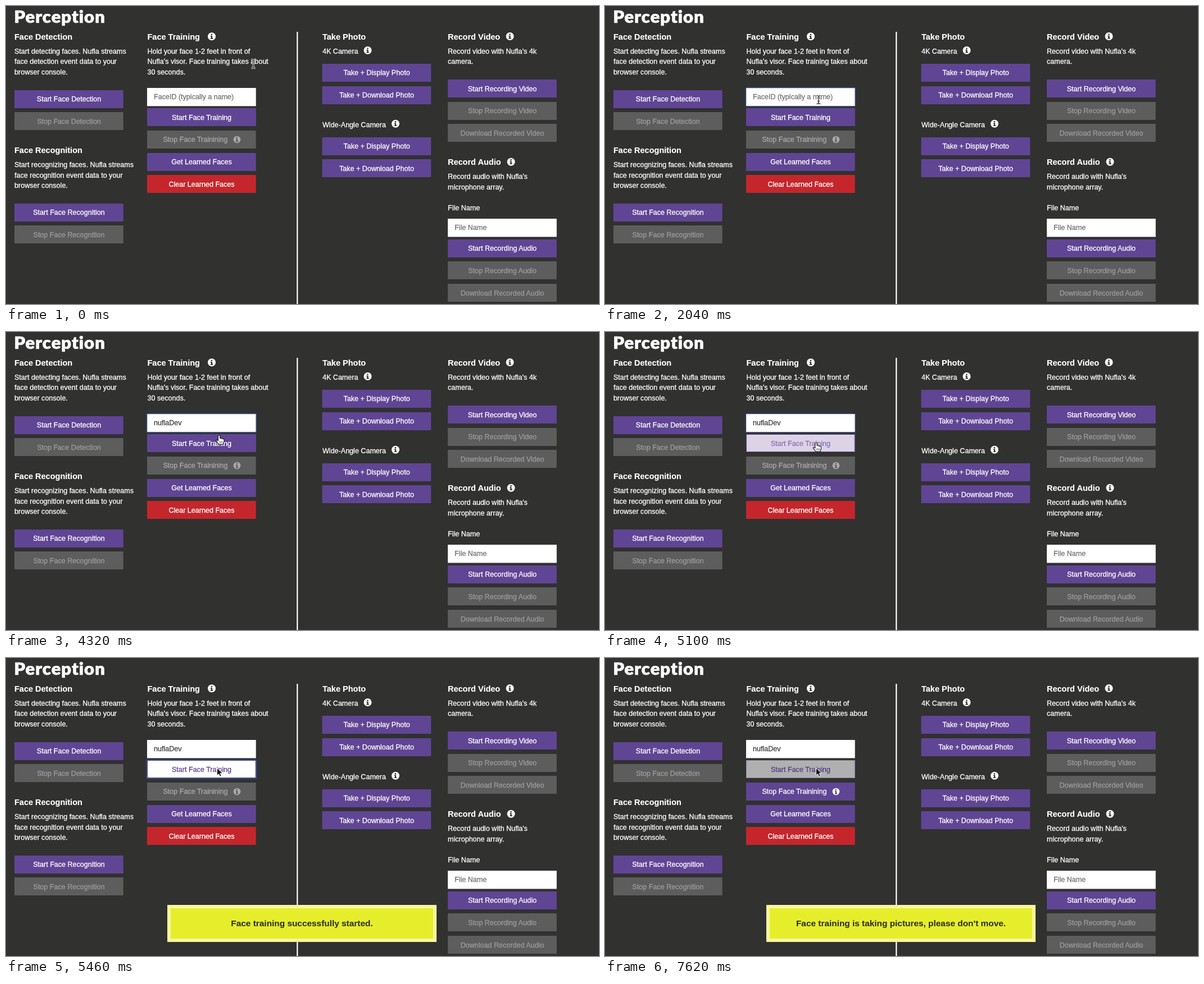
An HTML page that plays this animation: 1055 px wide and 531 px high, repeating every 8 s.

```html
<!DOCTYPE html>
<html lang="en">
<head>
<meta charset="utf-8">
<title>Perception</title>
<style>
html, body { margin: 0; width: 100%; height: 100%; overflow: hidden; background: #313130; }
svg { display: block; width: 1055px; height: 531px; }
text {
  font: 12.55px "Liberation Sans", Arial, sans-serif; white-space: pre;
  color: #fff; fill: currentColor; stroke: currentColor; stroke-width: .3px;
}
.title { font: 900 31px Lato, sans-serif; letter-spacing: 1px; stroke-width: .7px; }
.head { font-weight: bold; font-size: 14.5px; stroke-width: .15px; }
.toast { font-weight: bold; font-size: 15.4px; color: #33331c; stroke-width: .1px; }
.mid { text-anchor: middle; }
</style>
</head>
<body>
<svg id="stage" viewBox="0 0 1055 531"></svg>
<script>
const stage = document.getElementById('stage');
const PURPLE = [96, 69, 148], GREY = [93, 93, 93], WHITE = [255, 255, 255];
const rgb = c => `rgb(${c.map(Math.round)})`;
const mix = (a, b, k) => a.map((v, i) => v + (b[i] - v) * k);
const ramp = (t, from, to) => Math.min(1, Math.max(0, (t - from) / (to - from)));

function add(tag, attrs, parent = stage, content = '') {
  const el = document.createElementNS('http://www.w3.org/2000/svg', tag);
  set(el, attrs);
  el.textContent = content;
  return parent.appendChild(el);
}
function set(el, attrs) {
  for (const k in attrs) el.setAttribute(k, attrs[k]);
}
const label = (x, y, str, cls = '', parent = stage) => add('text', { x, y, class: cls }, parent, str);
const rect = (x, y, width, height, fill, parent = stage) => add('rect', { x, y, width, height, fill }, parent);
const para = (x, y, lines) => lines.forEach((s, i) => label(x, y + i * 18.5, s));

function button(x, y, str, fill = PURPLE, textX = x + 97) {
  const box = rect(x, Math.round(y - 16.2), 193.7, 32, rgb(fill));
  const text = label(textX, y + 4.3, str, 'mid');
  if (fill === GREY) text.style.color = '#9c9c9c';
  return { box, text };
}
function info(x, y, color = '#fff', hole = '#313130') {
  const disc = add('circle', { cx: x, cy: y, r: 7, fill: color });
  const mark = add('path', {
    d: `M${x - 1.3} ${y - 4.6}h2.4v2.3h-2.4zM${x - 2.2} ${y - 1.2}h3.3v4h1.1v1.6h-4.4v-1.6h1.1v-2.4h-1.1z`, fill: hole
  });
  return { disc, mark };
}
function field(x, y, hint) {
  rect(x, y - 16, 193.7, 32.4, '#fff');
  const text = label(x + 12, y + 4.3, hint);
  text.style.color = '#737373';
  return text;
}

// Static page
label(14.5, 29.7, 'Perception', 'title');
rect(517.2, 46, 2.2, 485, '#fff');

label(15, 59.5, 'Face Detection', 'head');
para(15, 84.7, ['Start detecting faces. Nufla streams', 'face detection event data to your', 'browser console.']);
button(15, 165.7, 'Start Face Detection');
button(15, 205.3, 'Stop Face Detection', GREY);
label(15, 262, 'Face Recognition', 'head');
para(15, 287.2, ['Start recognizing faces. Nufla streams', 'face recognition event data to your', 'browser console.']);
button(15, 367.9, 'Start Face Recognition');
button(15, 407.5, 'Stop Face Recognition', GREY);

label(251.5, 59.5, 'Face Training', 'head');
info(366, 54.3);
para(251.5, 84.7, ['Hold your face 1-2 feet in front of', "Nufla's visor. Face training takes about", '30 seconds.']);

label(563, 59.5, 'Take Photo', 'head');
label(563, 84.7, '4K Camera');
info(643.5, 79);
button(562.5, 119, 'Take + Display Photo');
button(562.5, 158.7, 'Take + Download Photo');
label(563, 215.5, 'Wide-Angle Camera');
info(693, 209.7);
button(562.5, 249.9, 'Take + Display Photo');
button(562.5, 289.4, 'Take + Download Photo');

label(786, 59.5, 'Record Video', 'head');
info(896.5, 54);
para(786, 84.7, ["Record video with Nufla's 4k", 'camera.']);
button(786, 147.3, 'Start Recording Video');
button(786, 187, 'Stop Recording Video', GREY);
button(786, 226.6, 'Download Recorded Video', GREY);
label(786, 283.2, 'Record Audio', 'head');
info(898.5, 277.7);
para(786, 308.3, ["Record audio with Nufla's", 'microphone array.']);
label(786, 364.3, 'File Name');
field(786, 395, 'File Name');
button(786, 431.9, 'Start Recording Audio');
button(786, 471.5, 'Stop Recording Audio', GREY);
button(786, 511.2, 'Download Recorded Audio', GREY);

// Animated parts
const ring = (y, height, width) => add('rect', {
  x: 250.5, y, width: 195, height, rx: 1, fill: 'none', stroke: '#33497f', 'stroke-width': width
});
const start = button(251, 198.3, 'Start Face Training');
const startEdge = add('rect', { x: 251.5, y: 182.5, width: 192.7, height: 31, fill: 'none' });
const stop = button(251, 238, 'Stop Face Trainining', GREY, 337);
const stopInfo = info(411, 238);
button(251, 277.7, 'Get Learned Faces');
button(251, 317.3, 'Clear Learned Faces', [196, 38, 44]);
const faceId = field(251, 162, '');
const caret = rect(0, 154.5, 1, 14, '#222');
const fieldRing = ring(145.5, 33.4, 1.5);
const startRing = ring(181.7, 33, 2);

const toast = add('g', {});
rect(287, 440, 479, 66, '#f8f69d', toast);
rect(293, 446, 467, 54, '#e6ee2c', toast);
const toastText = label(526.5, 477.7, '', 'toast mid', toast);

function cursor(shapes) {
  const g = add('g', {});
  for (const s of shapes) add('path', { 'stroke-linejoin': 'round', ...s }, g);
  return g;
}
const beamPath = 'M-3.5-7.5Q0-7.5 0-5V5Q0 7.5-3.5 7.5M3.5-7.5Q0-7.5 0-5V5Q0 7.5 3.5 7.5M-2 2.5H2';
const pointers = {
  beam: cursor([
    { d: beamPath, fill: 'none', stroke: '#eee', 'stroke-width': 2.8 },
    { d: beamPath, fill: 'none', stroke: '#222', 'stroke-width': 1.2 }
  ]),
  hand: cursor([
    { d: 'M-1.6 8V1.2Q-1.4 0 0 0T1.6 1.2V5.3Q3.4 4.3 4 6Q5.8 5 6.6 6.7Q9 6 9 8.3V11L7.4 16H-.3L-5 10.2Q-5.4 8-3.6 8.2L-1.6 10Z', fill: '#fff', stroke: '#111', 'stroke-width': 1.1 },
    { d: 'M1.4 10.5v3M3.6 10.5v3M5.8 10.5v3', fill: 'none', stroke: '#111', 'stroke-width': .8 }
  ]),
  arrow: cursor([
    { d: 'M0 0V13.2L3.1 10.4L5.2 15.2L7.6 14.1L5.5 9.4H9.6Z', fill: '#111', stroke: '#eee', 'stroke-width': 1 }
  ])
};

const path = [[120, 440, 103], [420, 433, 116], [600, 433, 116], [1380, 380, 167],
  [4140, 380, 167], [4320, 379, 184], [4860, 375.5, 197], [5100, 375.5, 197], [5340, 375.5, 196]];
const keys = [2280, 2400, 2460, 2640, 2760, 3120, 3300, 3480];
const typedName = 'nuflaDev';

function place(t) {
  let a = path[0];
  for (const b of path) {
    if (t < b[0]) {
      const k = ramp(t, a[0], b[0]), e = k * k * (3 - 2 * k);
      return [a[1] + (b[1] - a[1]) * e, a[2] + (b[2] - a[2]) * e];
    }
    a = b;
  }
  return [a[1], a[2]];
}

function draw(t) {
  // Name field
  const typed = keys.filter(k => t >= k).length;
  faceId.textContent = typed ? typedName.slice(0, typed) : 'FaceID (typically a name)';
  faceId.style.color = typed ? '#444' : '#737373';
  const caretOn = typed && (t < 3990 || t >= 4500 && t < 4920);
  set(caret, { x: typed ? 263.3 + faceId.getComputedTextLength() : 0, opacity: caretOn ? 1 : 0 });
  set(fieldRing, { opacity: ramp(t, 1740, 1890) * (1 - ramp(t, 5070, 5220)) });

  // Training buttons
  const running = t >= 5640;
  const pressed = t >= 5100 && t < 5190;
  const hover = ramp(t, 4320, 4620);
  const fill = running ? [176, 176, 176] : pressed ? [220, 211, 229] : mix(PURPLE, WHITE, hover);
  const ink = running ? [83, 65, 132] : pressed ? [137, 115, 184] : mix(WHITE, PURPLE, hover);
  set(start.box, { fill: rgb(fill) });
  set(startEdge, { stroke: running ? '#8f86aa' : rgb(PURPLE) });
  start.text.style.color = rgb(ink);
  set(startRing, { opacity: running ? 0 : ramp(t, 5130, 5280) });
  const base = rgb(running ? PURPLE : GREY), light = running ? '#fff' : '#a9a9a9';
  set(stop.box, { fill: base });
  stop.text.style.color = light;
  set(stopInfo.disc, { fill: light, r: 6.3 });
  set(stopInfo.mark, { fill: base });

  // Message
  set(toast, { opacity: ramp(t, 5220, 5400) });
  toastText.textContent = running ? "Face training is taking pictures, please don't move." : 'Face training successfully started.';

  // Pointer, hidden while typing
  const shown = t < 2280 || t >= 3960 && t < 4260 ? 'beam' : t < 3960 ? '' : t < 5340 ? 'hand' : 'arrow';
  const [x, y] = place(t);
  for (const name in pointers) {
    set(pointers[name], { transform: `translate(${x} ${y})`, opacity: name === shown ? 1 : 0 });
  }
}

const origin = performance.now();
function tick() {
  draw((performance.now() - origin) % 8000);
  requestAnimationFrame(tick);
}
tick();
</script>
</body>
</html>
```
